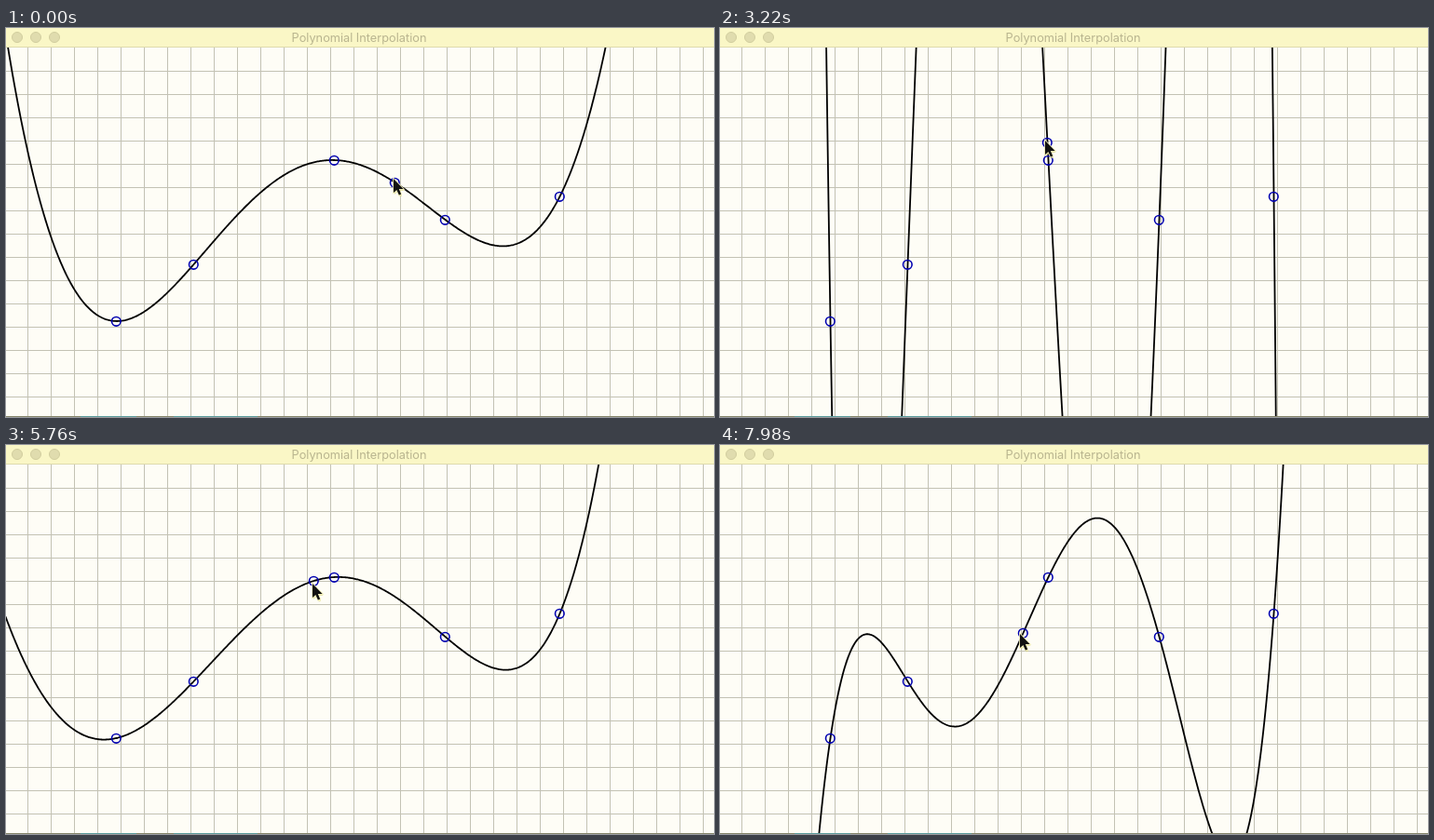
Recreate the animation shown at these times as an HTML page with a canvas. Size 760 by 418 pixels, loop 8000 ms.

```html
<!DOCTYPE html>
<html lang="en">
<head>
<meta charset="utf-8">
<title>Polynomial Interpolation</title>
<style>
  html, body { margin: 0; width: 100%; height: 100%; overflow: hidden; background: #fefdf6; }
  canvas { display: block; width: 760px; height: 418px; }
</style>
</head>
<body>
<canvas id="stage" width="760" height="418"></canvas>
<script>
const ctx = document.getElementById('stage').getContext('2d');
const W = 760, H = 418, BAR = 21, LOOP = 8000;

const fixed = [[118, 315], [201, 254], [352, 142], [471, 206], [594, 181]];

// time, dragged x, dragged y, pointer offset x, pointer offset y
const drag = [
  [0, 417, 166, -1, -4],
  [960, 405, 149, -1, -3],
  [2400, 370, 127, -3, -4],
  [3200, 352, 123, -2, -2],
  [4220, 342, 127, -1, 0],
  [5760, 330, 146, -1, 3],
  [7120, 328, 177, 0, 3],
  [7980, 325, 202, -3, 1]
];

// Screen updates run in 840 ms groups that end with a short hold.
function updateTime(t) {
  const phase = (t + 20) % 840;
  return Math.max(0, t - phase + Math.min(740, Math.floor(phase / 20) * 20));
}

function slope(i, col) {
  const a = drag[Math.max(0, i - 1)], b = drag[Math.min(drag.length - 1, i + 1)];
  return (b[col] - a[col]) / (b[0] - a[0]);
}

// Cubic Hermite value of one column of the drag table
function valueAt(t, col) {
  let i = 0;
  while (i < drag.length - 2 && t >= drag[i + 1][0]) i++;
  const a = drag[i], b = drag[i + 1], span = b[0] - a[0];
  const u = Math.min(1, (t - a[0]) / span), v = 1 - u;
  return v * v * (1 + 2 * u) * a[col] + u * u * (3 - 2 * u) * b[col]
    + span * u * v * (v * slope(i, col) - u * slope(i + 1, col));
}

// Newton form of the polynomial through all points
function interpolate(points) {
  const xs = points.map(p => p[0] / 100), c = points.map(p => p[1]);
  for (let k = 1; k < c.length; k++)
    for (let i = c.length - 1; i >= k; i--)
      c[i] = (c[i] - c[i - 1]) / (xs[i] - xs[i - k]);
  return x => c.reduceRight((sum, ci, i) => sum * (x / 100 - xs[i]) + ci, 0);
}

function rect(color, x, y, w, h) {
  ctx.fillStyle = color;
  ctx.fillRect(x, y, w, h);
}

function circle(x, y, r) {
  ctx.beginPath();
  ctx.arc(x, y, r, 0, 2 * Math.PI);
}

function drawWindow() {
  rect('#fefdf6', 0, 0, W, H);
  for (let x = 23; x < W; x += 25) rect('#c3c2b4', x, BAR, 1, H - BAR);
  for (let y = 46; y < H; y += 25) rect('#c3c2b4', 0, y, W, 1);
  rect('#faf7c6', 0, 0, W, BAR);
  rect('#dedaae', 0, BAR - 1, W, 1);
  for (const x of [12, 32, 52]) {
    circle(x, 10, 5.5);
    ctx.fillStyle = '#e0dcae';
    ctx.fill();
    ctx.strokeStyle = '#d2ce9f';
    ctx.lineWidth = 1;
    ctx.stroke();
  }
  ctx.fillStyle = '#b9b58f';
  ctx.font = '12.75px Inter, sans-serif';
  ctx.textAlign = 'center';
  ctx.fillText('Polynomial Interpolation', 379, 15);
  rect('#85856a', 0, H - 1, W, 1);
  rect('#5c9c9c', 80, H - 1, 60, 1);
  rect('#5c9c9c', 180, H - 1, 90, 1);
}

function drawCurve(f) {
  ctx.save();
  ctx.beginPath();
  ctx.rect(0, BAR, W, H - 1 - BAR);
  ctx.clip();
  ctx.beginPath();
  for (let x = -1; x <= W; x++) ctx.lineTo(x + .5, Math.max(-3000, Math.min(3000, f(x))));
  ctx.strokeStyle = '#000';
  ctx.lineWidth = 1.8;
  ctx.lineJoin = 'round';
  ctx.stroke();
  ctx.restore();
}

function drawPointer(x, y) {
  const arrow = new Path2D('M0 0V15L3.4 11.9L5.9 17.4L8.2 16.4L5.8 11H10.6Z');
  ctx.save();
  ctx.translate(x + 1, y + 2);
  ctx.fillStyle = 'rgba(225,220,130,.6)';
  ctx.fill(arrow);
  ctx.translate(-1, -2);
  ctx.strokeStyle = '#f4f1bd';
  ctx.lineWidth = 1.6;
  ctx.stroke(arrow);
  ctx.fillStyle = '#111';
  ctx.fill(arrow);
  ctx.restore();
}

function draw(time) {
  const t = updateTime(time);
  let x = Math.round(valueAt(t, 1));
  const y = Math.round(valueAt(t, 2));
  if (x === 352) x = 351; // two points may not share an x
  const points = [...fixed, [x, y]];
  drawWindow();
  drawCurve(interpolate(points));
  ctx.strokeStyle = '#0000b0';
  ctx.lineWidth = 1.6;
  for (const [px, py] of points) {
    circle(px + .3, py + .3, 4.8);
    ctx.stroke();
  }
  drawPointer(x + Math.round(valueAt(t, 3)), y + Math.round(valueAt(t, 4)));
}

const start = performance.now();
function tick() {
  draw((performance.now() - start) % LOOP);
  requestAnimationFrame(tick);
}
tick();
</script>
</body>
</html>
```
